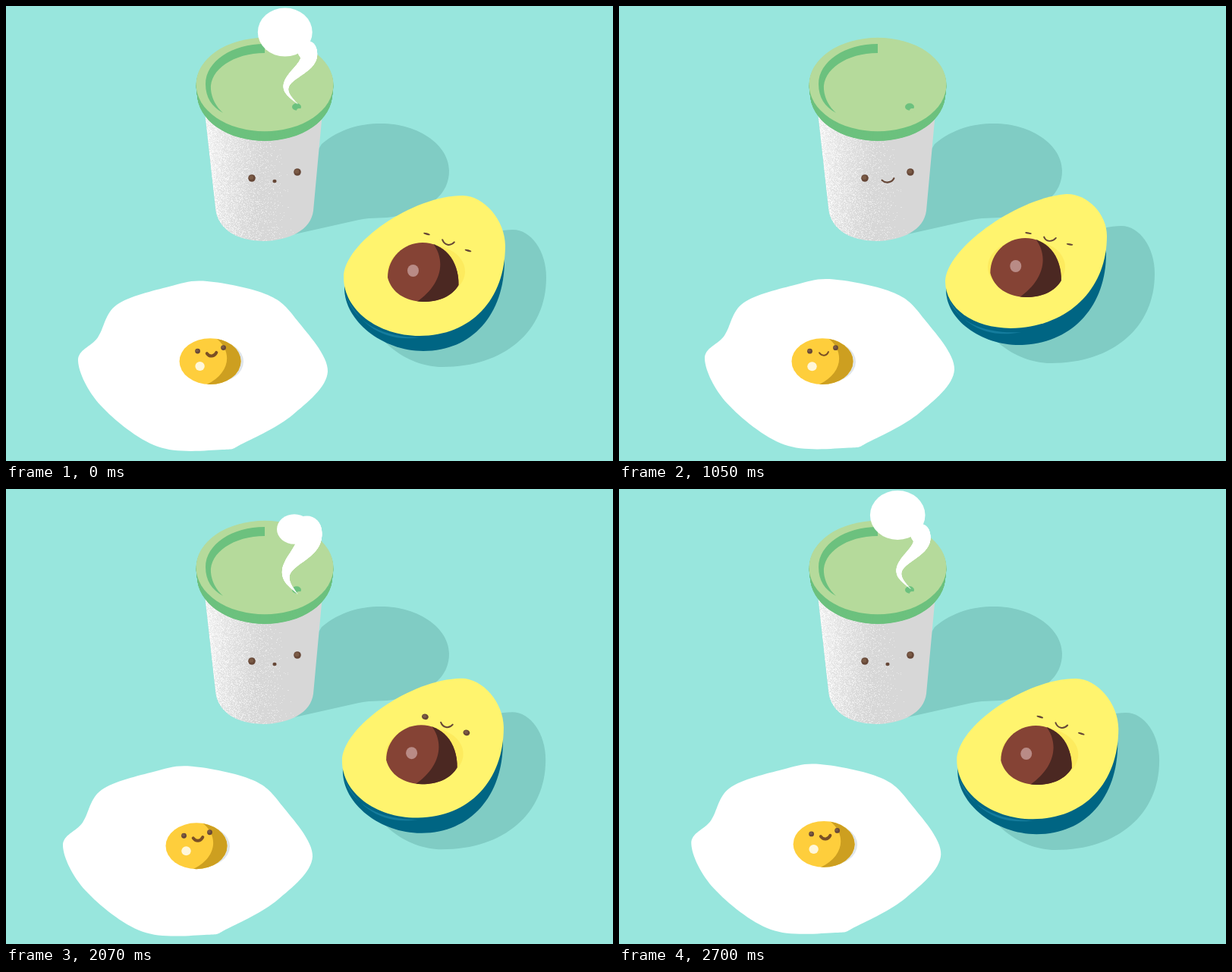
Recreate the animation shown at these times as an HTML page with a canvas. Size 800 px wide and 600 px high, loop 2.73 s.

```html
<!DOCTYPE html>
<html lang="en">
<head>
<meta charset="utf-8">
<title>Breakfast</title>
<style>
  html, body { margin: 0; width: 100%; height: 100%; overflow: hidden; background: #98e6dd; }
  canvas { display: block; }
</style>
</head>
<body>
<canvas id="stage" width="800" height="600"></canvas>
<script>
const LOOP = 2730, STEP = 30, WRAP = 1200;
const BG = '#98e6dd', SHADE = '#80ccc4', BROWN = '#664737', LIME = '#b5da9b', GREEN = '#6cc17e';
const stage = document.getElementById('stage').getContext('2d');
let g = stage;

const linear = p => p;
const swing = p => 0.5 - 0.5 * Math.cos(Math.PI * p);
const mix = (a, b, p) => a + (b - a) * p;

// Keys are [time, value, value, ...]; returns the values at time t.
function track(t, keys, easing = swing) {
  const next = keys.findIndex(key => key[0] > t);
  if (next <= 0) return keys.at(next).slice(1);
  const a = keys[next - 1], b = keys[next];
  const p = easing((t - a[0]) / (b[0] - a[0]));
  return a.slice(1).map((v, i) => mix(v, b[i + 1], p));
}

function within(dx, dy, draw) {
  g.save();
  g.translate(dx, dy);
  draw();
  g.restore();
}

function fill(path, color) {
  g.fillStyle = color;
  g.fill(path);
}

function fillInside(outer, inner, color) {
  g.save();
  g.clip(outer);
  fill(inner, color);
  g.restore();
}

function ellipse(x, y, rx, ry, color, turn = 0) {
  const path = new Path2D();
  path.ellipse(x, y, rx, ry, turn, 0, Math.PI * 2);
  fill(path, color);
  return path;
}

// Lopsided oval through its left, top, right and bottom extremes.
function oval(left, top, right, bottom, tension) {
  const path = new Path2D();
  const corner = (a, b, upright, k) => {
    const dx = (b[0] - a[0]) * k, dy = (b[1] - a[1]) * k;
    if (upright) path.bezierCurveTo(a[0], a[1] + dy, b[0] - dx, b[1], ...b);
    else path.bezierCurveTo(a[0] + dx, a[1], b[0], b[1] - dy, ...b);
  };
  path.moveTo(...left);
  corner(left, top, true, tension[0]);
  corner(top, right, false, tension[1]);
  corner(right, bottom, true, tension[2]);
  corner(bottom, left, false, tension[3]);
  return path;
}

// Closed smooth curve through a few points.
function blob(points) {
  const path = new Path2D();
  const at = i => points[(i + points.length) % points.length];
  path.moveTo(...at(0));
  points.forEach((b, i) => {
    const a = at(i - 1), c = at(i + 1), d = at(i + 2);
    path.bezierCurveTo(
      b[0] + (c[0] - a[0]) / 6, b[1] + (c[1] - a[1]) / 6,
      c[0] - (d[0] - b[0]) / 6, c[1] - (d[1] - b[1]) / 6, ...c);
  });
  return path;
}

function smile(x, y, half, depth, tilt, width, color = BROWN) {
  g.save();
  g.translate(x, y);
  g.rotate(tilt);
  g.beginPath();
  g.moveTo(-half, 0);
  g.bezierCurveTo(-half / 2, depth * 4 / 3, half / 2, depth * 4 / 3, half, 0);
  g.lineWidth = width;
  g.lineCap = 'round';
  g.strokeStyle = color;
  g.stroke();
  g.restore();
}

function eye(x, y, rx, ry = rx, turn = 0) {
  ellipse(x, y, rx, ry, BROWN, turn);
  if (ry > 2) ellipse(x - 0.7, y - 0.8, rx * 0.6, ry * 0.55, '#7b5b46', turn);
}

const cupShadow = new Path2D(`M340 310 L416 182 C440 162 466 155 494 155
  C546 155 584 185 584 217 C584 248 560 268 515 277 C496 281 485 278 465 282 Z`);
const cupBody = new Path2D(`M262 140 L276 266 C279 296 306 310 341 310
  C374 309 402 295 405 270 L417 140 Z`);
const lidGroove = new Path2D(`M341 50 C298 50 263 73 263 103 C263 120 271 133 286 141
  C277 133 271 122 270 110 C268 84 300 62 341 62 Z`);
const eggWhite = blob([[95, 468], [121, 437], [146, 394], [215, 370], [265, 363], [345, 381],
  [384, 415], [424, 482], [378, 539], [312, 577], [285, 585], [200, 581], [125, 527]]);
const avoShadow = oval([480, 400], [668, 295], [712, 358], [575, 476], [0.3, 0.55, 0.6, 0.5]);
const avoShell = oval([446, 372], [600, 300], [657, 335], [550, 455], [0.5, 0.5, 0.6, 0.52]);
const avoSheen = new Path2D('M447 380 C460 420 500 437 545 437 C498 444 465 420 447 380 Z');
const avoFlesh = oval([445, 358], [602, 250], [658, 316], [545, 435], [0.42, 0.5, 0.6, 0.55]);
const pit = new Path2D(`M503 358 C503 332 524 312 549 312 C576 312 597 334 596.5 368
  C588 383 570 390 550 390 C526 389 508 378 503 358 Z`);
const pitDark = new Path2D('M562 312 C582 338 572 370 540 391 H610 V312 Z');
const yolkDark = new Path2D('M6 -32 C32 -13 26 18 -8 32 H50 V-32 Z');

function drawScenery() {
  g.fillStyle = BG;
  g.fillRect(0, 0, 800, 600);
  fill(cupShadow, SHADE);
  drawCupBody();
  for (let drop = 12.5; drop > 0; drop -= 0.5) ellipse(341, 104 + drop, 90.5 - drop * 0.13, 61.5, GREEN);
  ellipse(341, 103.5, 90.5, 61.8, LIME);
  fill(lidGroove, GREEN);
  ellipse(383, 133, 6, 4.7, GREEN);
  ellipse(386.5, 138, 3.5, 3, LIME);
  eye(324, 227, 4.8);
  eye(384, 219, 4.8);
}

function drawCupBody() {
  const shine = g.createLinearGradient(268, 0, 358, 10);
  shine.addColorStop(0, '#eeeeee');
  shine.addColorStop(1, '#d7d7d7');
  fill(cupBody, shine);

  let seed = 7;
  const random = () => (seed = (seed * 16807) % 2147483647) / 2147483647;
  g.save();
  g.clip(cupBody);
  g.fillStyle = 'rgba(255, 255, 255, 0.45)';
  for (let i = 0; i < 6000; i++) {
    const across = random() * random(), y = 140 + random() * 172;
    g.fillRect(Math.round(262 + (y - 140) * 0.11 + across * 100), Math.round(y), 1, 1);
  }
  g.restore();
}

function drawCupMouth(t) {
  const [open] = track(t, [[1500, 1], [1680, 0], [3030, 0], [3270, 1]]);
  if (open < 0.1) ellipse(354, 231, 2.6, 2.2, BROWN);
  else smile(354.5, 230 - open * 1.5, 8 * open, 4 * open, -0.16, mix(3.5, 2.2, open));
}

// A puff on top of a tail that winds up from the hole in the lid.
function drawSteam(t) {
  const [x, y, rx, ry, root, top, neck] = track(t, [
    [1430, 384, 133, 0, 0, 138, 133, 0],
    [1530, 384, 132, 19, 14.5, 138, 132, 0],
    [2070, 380, 53, 23, 19.8, 138, 54, 19],
    [2370, 361, 35, 32, 33.5, 138, 54, 13.5],
    [2715, 367.5, 34.5, 36.5, 32.5, 131, 58, 12.5],
    [3270, 377, 35, 16, 16, 48, 40, 1],
    [3440, 376, 39, 0, 0, 39, 39, 0]
  ], linear);
  for (let s = 0; s <= 1; s += 0.01) {
    const r = neck * s ** 1.2 + Math.min(neck, 0.5);
    ellipse(384 - 15 * Math.sin(5.34 * s), mix(root, top, s), r, r, '#fff');
  }
  ellipse(x, y, rx, ry, '#fff');
}

function drawAvocado(t) {
  const sway = Math.cos((t - 2480) / LOOP * Math.PI * 2);
  const k = (sway - 0.84) / 1.83;
  const shift = (dx, dy, draw) => within(k * dx, k * dy, draw);
  // Slides sideways while the height leans with x and flattens with y.
  const lean = (byX, byY, draw) => {
    g.save();
    g.transform(1, k * byX, 0, 1 + k * byY, 15 * k, k * (0.5 - byX * 550 - byY * 300));
    draw();
    g.restore();
  };

  shift(6, 5, () => fill(avoShadow, SHADE));
  lean(0.06, 0.05, () => {
    fill(avoShell, '#006583');
    fill(avoSheen, '#147c9d');
  });
  lean(0.1, 0.08, () => fill(avoFlesh, '#fff46e'));
  shift(17, 6, () => ellipse(554, 350, 51, 36, '#fdeb5e'));
  shift(13.7, 6, () => {
    fill(pit, '#854335');
    fillInside(pit, pitDark, '#4b2822');
    ellipse(536.5, 349, 7.5, 8, '#b98b86');
  });
  lean(0.1, 0.08, () => {
    const [lid] = track(t, [[1260, 1.2], [1350, 3.7], [2520, 3.7], [2640, 1.2]]);
    eye(554.5, 300.5, 4.5, lid, 0.3);
    eye(609, 322.5, 4.5, lid, 0.3);
    smile(583, 309.8, 8, 5, 0.2, 2);
  });
}

function drawEgg(t) {
  const [slide] = track(t, [[1620, 18], [2070, -20], [2370, 62], [2715, 0], [3690, 18]]);
  const [roll] = track(t, [[1620, 0], [2070, -17], [2385, 15.5], [2800, 0]]);
  const [grin] = track(t, [[1620, 0], [1950, 1], [2850, 1], [3270, 0]]);

  within(slide, -0.134 * slide, () => fill(eggWhite, '#fff'));
  within(268 + roll, 468.7 - 0.12 * roll, () => {
    ellipse(5, 0.5, 39, 28, '#dfe5ea');
    const yolk = ellipse(0, 0, 40.5, 30.4, '#fece3c');
    fillInside(yolk, yolkDark, '#cd9f20');
    ellipse(-13.5, 6.5, 6.2, 6, '#fff7da');
    eye(-16.5, -13.5, 3.4);
    eye(17.5, -18, 3.4);
    smile(2, -12 + grin, mix(6, 6.3, grin), 4, -0.1, mix(2, 4, grin), '#7a4f25');
  });
}

const scenery = document.createElement('canvas');
scenery.width = 800;
scenery.height = 600;
g = scenery.getContext('2d');
drawScenery();
g = stage;

const start = performance.now();
function frame(now) {
  const phase = Math.floor(Math.max(0, now - start) % LOOP / STEP) * STEP;
  const t = phase < WRAP ? phase + LOOP : phase;
  g.drawImage(scenery, 0, 0);
  drawCupMouth(t);
  drawSteam(t);
  drawAvocado(t);
  drawEgg(t);
  requestAnimationFrame(frame);
}
frame(start);
</script>
</body>
</html>
```
